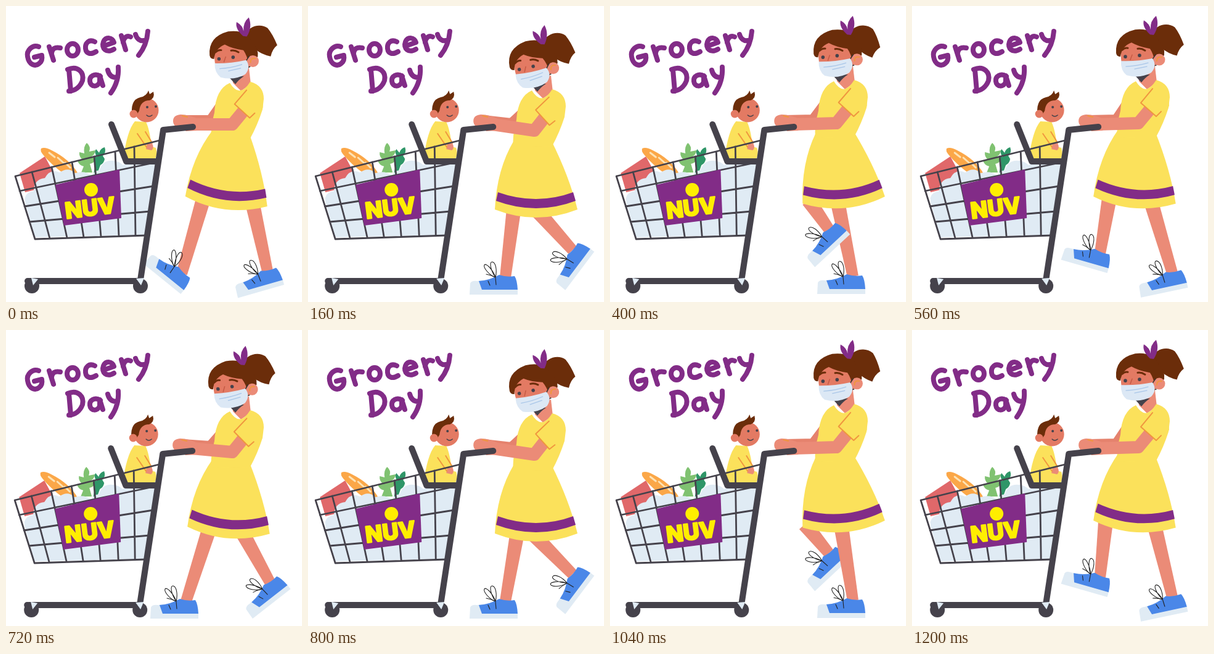
Recreate the animation shown at these times as an HTML page. Size 480x480 px, loop 1.28 s.

```html
<!DOCTYPE html>
<html lang="en">
<head>
<meta charset="utf-8">
<title>Grocery Day</title>
<style>
  html, body { margin: 0; width: 100%; height: 100%; overflow: hidden; background: #fff; }
  svg { display: block; width: 100vw; height: 100vh; }
  .line { fill: none; stroke-linecap: round; stroke-linejoin: round; }
  .skin { fill: #eb8b77; }
  .face { fill: #e37a63; }
  .hair { fill: #6b2d0a; }
  .dress { fill: #fbe15b; }
  .purple { fill: #822c87; }
  .pale { fill: #e0ebf4; }
  .dark { fill: #45424b; }
  .frame { stroke: #45424b; }
  .seam { stroke: #f0963f; stroke-width: 2; }
</style>
</head>
<body>
<svg viewBox="0 0 480 480">
  <defs>
    <g id="shoe">
      <path class="pale" d="M-60 28L-59 10Q-57 5 -48 6L-38 5L18 19V28Z"/>
      <path fill="#4a87e8" d="M-40 20L-45 6Q-28 5 -12 -4Q0 0 13 -2Q17 4 18 20Z"/>
      <g class="line" stroke="#222" stroke-width="1.1">
        <path d="M-18 0C-29 -4 -38 -16 -36 -20S-23 -14 -18 0C-27 -13 -28 -26 -23 -25S-15 -13 -18 0"/>
        <path d="M-33 -5Q-26 -4 -18 0M-30 6L-27 13M-18 1L-17 12"/>
      </g>
    </g>
  </defs>

  <g class="line" stroke="#822c87" stroke-width="8" role="img" aria-label="Grocery Day">
    <path d="M53 66C43 62 33 72 35 82C37 95 47 99 54 93C58 90 59 85 58 80L46 83"/>
    <path d="M70 66L77 88M74 78C74 69 80 66 88 68"/>
    <ellipse cx="108" cy="71" rx="9" ry="10"/>
    <path d="M144 58C134 53 128 61 129 69C130 78 138 79 146 74"/>
    <path d="M158 65L175 59C173 51 162 49 158 58C154 69 163 77 175 70"/>
    <path d="M187 48L194 71M190 59C191 51 196 47 202 50"/>
    <path d="M210 46C212 53 217 57 223 56M230 41C229 54 224 69 215 80"/>
    <path d="M102 103L105 138M100 103C117 96 127 108 124 121C120 132 111 138 102 138"/>
    <path d="M153 114C144 108 135 114 136 122C137 132 149 132 152 123L152 113L157 129"/>
    <path d="M165 104C167 112 172 116 179 116M182 99C183 115 178 130 170 141"/>
  </g>

  <path id="farArm" class="line" stroke="#e5826d" stroke-width="14"/>
  <path id="farLeg" class="skin"/><use id="farShoe" href="#shoe"/>
  <path id="nearLeg" class="skin"/><use id="nearShoe" href="#shoe"/>

  <g id="body">
    <path class="skin" d="M366 104L394 98L397 124L381 135L368 122Z"/>
    <path class="dark" d="M361 112L386 111Q378 116 372 124Z"/>
    <g id="skirt">
      <path class="dress" d="M334 203Q306 250 303 315Q370 341 437 315Q424 262 394 202Z"/>
      <path class="purple" d="M308 287Q370 309 430 287L434 301Q370 325 305 301Z"/>
    </g>
    <path class="dress" d="M363 122Q379 148 396 120Q418 126 418 148L416 165Q408 190 396 212L333 214Q331 195 338 170Q340 132 363 122Z"/>
  </g>
  <path id="nearArm" class="line" stroke="#eb8b77" stroke-width="20"/>
  <g id="hand">
    <path class="skin" d="M271 188Q270 177 283 176Q298 176 312 184L310 202L292 203Q286 197 279 197Q272 195 271 188Z"/>
    <path class="line seam" d="M286 178L294 180"/>
  </g>
  <g id="sleeve">
    <path class="dress" d="M393 126L371 157L397 180L417 162L416 138Z"/>
    <path class="line seam" d="M390 134L371 157L396 179L404 171"/>
  </g>

  <g id="head">
    <path id="tail" class="hair" d="M388 46C394 30 414 25 426 34Q434 44 441 62Q433 68 430 80Q416 77 405 68L390 66Z"/>
    <path class="face" d="M338 62Q360 52 395 58L396 95Q385 114 362 113Q340 108 339 85Z"/>
    <path class="hair" d="M331 76Q329 46 362 38Q392 35 400 56Q411 66 409 80L394 92Q392 78 386 69Q368 66 356 59Q340 65 338 82Q332 82 331 76Z"/>
    <path class="purple" d="M386 46Q373 34 376 23Q386 29 387 38Q386 24 396 16Q402 32 392 47Z"/>
    <circle class="skin" cx="401" cy="87" r="9.5"/>
    <path class="line seam" d="M397 89Q397 81 405 83"/>
    <path class="line" stroke="#6b2d0a" stroke-width="3" d="M341 71Q345 67 350 68M366 69Q372 68 378 72"/>
    <path class="line" stroke="#c55a45" stroke-width="1.5" d="M357 79L354 87"/>
    <circle class="dark" cx="346" cy="82" r="2.8"/><circle class="dark" cx="369" cy="80" r="2.8"/>
    <path class="line" stroke="#333" stroke-width="1.5" d="M390 86L395 79M391 97L396 96"/>
    <path fill="#dce8f5" d="M339 89Q365 90 390 85Q398 97 388 108Q370 118 348 112Q338 104 339 89Z"/>
    <path class="line" stroke="#a9c6e8" stroke-width="1.3" d="M347 98Q366 97 383 92M361 102L381 98"/>
  </g>

  <g id="cart">
    <path fill="#e0686a" d="M22 271L63 244L76 268L72 292L31 302Z"/>
    <path fill="#fba748" d="M57 231Q63 228 74 234Q104 249 117 272L94 272Q74 258 60 241Q55 235 57 231Z"/>
    <path class="line" stroke="#fde3b5" stroke-width="3" d="M70 238L79 245M84 246L93 254M96 254L104 262"/>
    <path fill="#80c271" d="M131 222Q138 228 135 236L145 234Q144 242 137 245L147 247Q143 255 136 256L140 270H122L126 260Q118 258 116 251L125 250Q118 245 119 237L127 239Q125 228 131 222Z"/>
    <path fill="#2f9668" d="M160 229Q163 237 157 243L160 248Q159 255 153 258L148 272H142L145 256Q140 250 143 243L148 245Q142 238 146 232L151 238Q153 231 160 229Z"/>
    <path class="pale" d="M47 375L31 318Q28 303 45 300Q45 281 63 279Q72 263 87 270Q101 260 112 271Q128 266 139 275Q145 265 151 267Q157 249 174 251Q184 252 190 258Q198 250 210 254L243 255L229 371Z"/>

    <path class="dress" d="M209 187Q196 202 190 250L240 250Q247 242 243 230L236 228Q233 200 227 188Z"/>
    <path class="skin" d="M229 222L237 223Q241 230 236 234L227 232Z"/>
    <path class="line seam" d="M213 207L228 229M226 204L237 222"/>
    <circle class="face" cx="228" cy="169" r="19.5"/>
    <path class="hair" d="M205 181Q200 152 218 148Q228 146 231 137L233 143L239 139Q242 149 233 153Q218 153 216 170L209 181Z"/>
    <circle class="face" cx="207" cy="175" r="6.5"/>
    <circle class="dark" cx="229" cy="164" r="2"/><circle class="dark" cx="243" cy="163" r="2"/>
    <path class="line frame" stroke-width="1.5" d="M228 177Q232 181 237 177"/>

    <path class="line frame" stroke-width="2.8" d="M15 276L253 217M15 276L47 378L228 372M22 300L246 253M30 325L240 292M38 350L234 333
      M42 269L71 377M74 261L99 376M107 253L126 375M143 244L154 374M177 236L183 373M208 228L210 372"/>
    <path class="line frame" stroke-width="10" d="M171 192L195 252H243M303 196L255 201L218 444M35 446H216"/>
    <circle class="dark" cx="42" cy="454" r="12"/><circle class="dark" cx="218" cy="454" r="12"/>
    <path class="pale" d="M41 441L52 443L44 453ZM211 442L224 441L219 453Z"/>

    <path class="purple" d="M80 290L184 265L187 344L94 356Z"/>
    <circle cx="138" cy="298" r="11" fill="#ffee00"/>
    <text transform="translate(138 340) rotate(-7)" text-anchor="middle" font-family="Inter, 'Open Sans', sans-serif"
      font-weight="800" font-size="36" fill="#ffee00" stroke="#ffee00" stroke-width="2.5" stroke-linejoin="round">NUV</text>
  </g>
</svg>
<script>
const LOOP = 1280, STEP = 640, TICK = 80;
const $ = id => document.getElementById(id);
const set = (id, name, value) => $(id).setAttribute(name, value);
const move = (id, x, y, extra = '') => set(id, 'transform', `translate(${x} ${y}) ${extra}`);

// Walk cycle of one leg: time, ankle x, y, shoe angle, knee x, y
const gait = [
  [0, 287, 434, 39, 325, 306],
  [80, 294, 440, 0, 328, 318],
  [160, 322, 440, 0, 338, 320],
  [240, 359, 443, 0, 355, 320],
  [400, 396, 439, 0, 371, 312],
  [560, 424, 433, -12, 389, 312],
  [640, 426, 430, -16, 395, 312],
  [720, 430, 409, -38, 385, 326],
  [800, 431, 396, -53, 366, 329],
  [880, 411, 368, -67, 354, 333],
  [1040, 357, 362, -43, 319, 315],
  [1200, 307, 401, 16, 317, 312]
];

function key(i) {
  const n = gait.length, [t, ...pose] = gait[(i + n) % n];
  return [t + Math.floor(i / n) * LOOP, ...pose];
}

// Smooth curve through the key poses
function poseAt(t) {
  const i = gait.findLastIndex(k => k[0] <= t);
  const [a, b, c, d] = [-1, 0, 1, 2].map(j => key(i + j));
  const span = c[0] - b[0], u = (t - b[0]) / span;
  return b.slice(1).map((from, j) => {
    const n = j + 1, to = c[n];
    const m0 = (to - a[n]) / (c[0] - a[0]) * span;
    const m1 = (d[n] - from) / (d[0] - b[0]) * span;
    return from + u * m0 + u * u * (3 * (to - from) - 2 * m0 - m1) + u * u * u * (2 * (from - to) + m0 + m1);
  });
}

function drawLeg(side, t, hip) {
  const [ax, ay, angle, knee, ky] = poseAt(t % LOOP), kx = knee + hip;
  const len = Math.hypot(ax - kx, ay - ky), nx = (ay - ky) / len, ny = (kx - ax) / len;
  const at = (x, y, w) => `${x + nx * w} ${y + ny * w}`;
  const foot = ax - 2;
  set(side + 'Leg', 'd', `M${at(kx, ky, 12)}L${at(foot, ay, 9)}L${at(foot, ay, -9)}L${at(kx, ky, -12)}Z`);
  move(side + 'Shoe', ax, ay, `rotate(${angle})`);
}

function draw(t) {
  const wave = peak => (1 + Math.cos((t - peak) / STEP * 2 * Math.PI)) / 2;
  const bob = 15 * wave(160) ** 2.5;
  const push = -5.5 * wave(320);
  const nod = wave(200) ** 1.5;

  drawLeg('far', t, -3);
  drawLeg('near', t + STEP, 3);
  move('body', 0, bob);
  move('sleeve', 0, bob, `rotate(${7 * nod} 400 140)`);
  move('cart', push, 0);
  move('hand', push, 0);
  set('skirt', 'transform', `rotate(${14 * wave(0) - 7} 370 210)`);
  move('head', 0, bob + 2 * nod, `rotate(${-8 * nod} 375 110)`);
  set('tail', 'transform', `rotate(${10 * wave(300)} 395 52)`);
  set('farArm', 'd', `M${288 + push} 184L${331 + push / 2} ${183 + bob * 0.4}L348 ${157 + bob}`);
  set('nearArm', 'd', `M${302 + push} 192L367 ${190 + bob * 0.8}L${392 - 4 * nod} ${160 + bob}`);
}

function tick(now) {
  draw(Math.floor(now % LOOP / TICK) * TICK);
  requestAnimationFrame(tick);
}
draw(0);
const start = performance.now();
requestAnimationFrame(function frame(now) {
  draw(Math.floor(Math.max(0, now - start) % LOOP / TICK) * TICK);
  requestAnimationFrame(frame);
});
</script>
</body>
</html>
```
